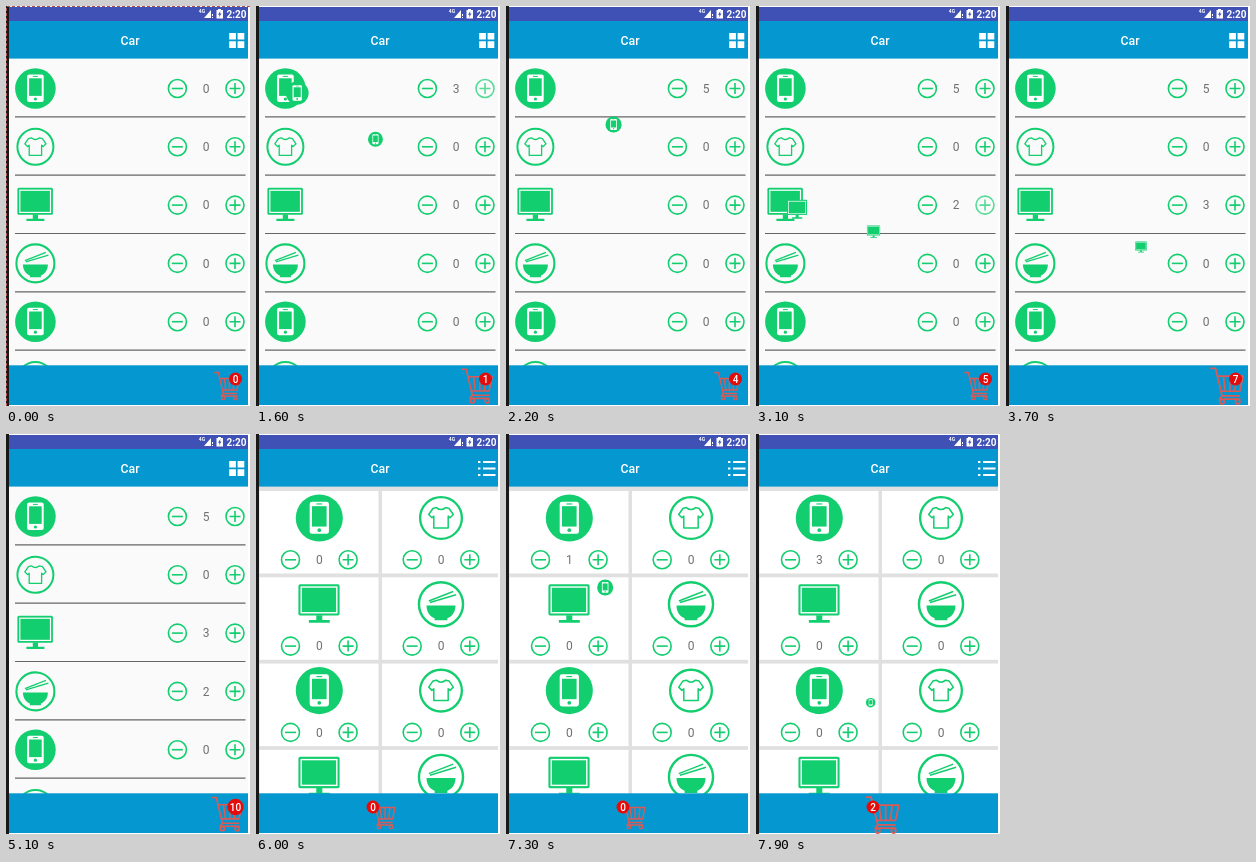
An HTML page that plays this animation: 244x400 px, repeating every 8 s.

```html
<!DOCTYPE html>
<html lang="en">
<head>
<meta charset="utf-8">
<title>Car</title>
<style>
  html, body { margin: 0; width: 100%; height: 100%; overflow: hidden; background: #fff; }
  svg { display: block; }
  text { font-family: Roboto, "Open Sans", sans-serif; text-anchor: middle; }
  .count { font-size: 12px; fill: #707070; }
</style>
</head>
<body>
<svg id="stage" width="244" height="400" viewBox="0 0 244 400">
  <defs>
    <g id="phone">
      <circle r="20.3" fill="#13ce6f"/>
      <rect x="-8.3" y="-14" width="16.6" height="27.6" rx="2" fill="#fff"/>
      <rect x="-6.3" y="-10.2" width="12.6" height="17.6" fill="#13ce6f"/>
      <path d="M-2.5-12.1h5" stroke="#13ce6f" stroke-width="1"/>
      <circle cy="10.5" r="1.6" fill="#13ce6f"/>
    </g>
    <g id="shirt" fill="none" stroke="#13ce6f" stroke-linejoin="round">
      <circle r="18" stroke-width="2"/>
      <path d="M-4-9Q0-5.5 4-9L7-8.2 10.6-3 7.8-.2 6.2-1.6V8.6H-6.2V-1.6L-7.8-.2-10.6-3-7-8.2Z" stroke-width="1.3"/>
    </g>
    <g id="monitor" fill="#13ce6f">
      <rect x="-18" y="-17.3" width="35.5" height="27" rx="1.5"/>
      <rect x="-15.6" y="-14.9" width="30.7" height="22.2" fill="none" stroke="#fff" stroke-width="1.2"/>
      <path d="M-2.6 9.5H2.6V13.6H9V16H-9V13.6H-2.6Z"/>
    </g>
    <g id="bowl" stroke="#13ce6f" fill="none">
      <circle r="19" stroke-width="2.1"/>
      <path d="M-12.5 1H12.5C12.5 6.8 9 10.8 5.5 12V13.8H-5.5V12C-9 10.8-12.5 6.8-12.5 1Z" fill="#13ce6f" stroke="none"/>
      <path d="M-10.5-2.8L10.5-11M-9.5-1.5L13-8.3" stroke-width="1.3"/>
    </g>
    <g id="minus" fill="none" stroke="#13ce6f" stroke-width="1.6">
      <circle r="9"/><path d="M-5.5 0H5.5"/>
    </g>
    <g id="plus" fill="none" stroke="#13ce6f" stroke-width="1.6">
      <circle r="9"/><path d="M-5.5 0H5.5M0-5.5V5.5"/>
    </g>
  </defs>

  <rect width="244" height="400" fill="#fff"/>
  <rect x="3" y="52" width="239" height="308" fill="#fafafa"/>
  <g id="list"></g>
  <g id="grid"><rect x="3" y="52" width="239" height="308" fill="#e0e0e0"/></g>

  <rect x="3" y="1" width="239" height="14" fill="#3f51b5"/>
  <rect x="3" y="15" width="239" height="37.6" fill="#0598d0"/>
  <rect x="3" y="359.3" width="239" height="39.7" fill="#0598d0"/>
  <rect x="242" width="2" height="400" fill="#fff"/>
  <rect width="3" height="400" fill="#181818"/>
  <path id="frame" d="M.5 400V.5H244" fill="none" stroke="#b05050" stroke-dasharray="3 2"/>

  <g fill="#fff">
    <text x="196" y="7" font-size="5" font-weight="700">4G</text>
    <path d="M205 4V12H198ZM206 8h1v2h-1zM206 11h1v1h-1z"/>
    <path d="M212 4V3H215V4H217V12.6H210.5V4Z"/>
    <path d="M214.4 5L212 8.8H213.5L213 11.5 215.5 7.6H214Z" fill="#3f51b5"/>
    <text x="230.5" y="12" font-size="10" font-weight="700">2:20</text>
    <text x="124" y="39.4" font-size="12.3" font-weight="500">Car</text>
    <path id="gridIcon" d="M223.2 27h6.7v6.6h-6.7zM231.6 27h6.7v6.6h-6.7zM223.2 35.3h6.7v6.6h-6.7zM231.6 35.3h6.7v6.6h-6.7z"/>
    <path id="listIcon" d="M222 27h2.4v2H222zM227 27h12.5v2H227zM222 33.5h2.4v2H222zM227 33.5h12.5v2H227zM222 40h2.4v2H222zM227 40h12.5v2H227z"/>
  </g>

  <g id="cart" fill="none" stroke="#dc5a55" stroke-width="1.3" stroke-linejoin="round">
    <path d="M-13-13.5H-9L-4 7.5H9.5M-7.5-7.5H12L9.5 4H-5M-3-7.5L-1.5 4M2-7.5V4M7-7.5L5.7 4M-4 7.5L-6 10H10"/>
    <circle cx="-4" cy="12" r="1.7"/><circle cx="8" cy="12" r="1.7"/>
  </g>
  <g id="badge">
    <circle fill="#e40b0b"/>
    <text y="3.5" font-size="10" font-weight="500" fill="#fff">0</text>
  </g>
  <g id="flights"></g>
</svg>
<script>
const LOOP = 8000, SWITCH = 5900, FLIGHT = 400, BOUNCE = 500, PRESS = 100;
const ITEMS = ["phone", "shirt", "monitor", "bowl"];
const $ = id => document.getElementById(id);

function add(parent, tag, attrs) {
  const node = document.createElementNS("http://www.w3.org/2000/svg", tag);
  for (const key in attrs) node.setAttribute(key, attrs[key]);
  return parent.appendChild(node);
}
const place = (x, y, s = 1) => `translate(${x} ${y}) scale(${s})`;
const show = (node, on) => node.setAttribute("visibility", on ? "visible" : "hidden");

function addItem(parent, name, x, y, scale, cx, cy, gap) {
  add(parent, "use", { href: "#" + name, transform: place(x, y, scale) });
  add(parent, "use", { href: "#minus", transform: place(cx - gap, cy) });
  const plus = add(parent, "use", { href: "#plus", transform: place(cx + gap, cy) });
  const count = add(parent, "text", { class: "count", x: cx, y: cy + 4.3 });
  return { name, x, y, scale, plus, count };
}

const views = [
  { node: $("list"), items: [], cart: [221.3, 380], badge: [229.5, 373], target: [222, 375], shift: [9.5, 5] },
  { node: $("grid"), items: [], cart: [127, 381], badge: [117, 373], target: [125, 378], shift: [10, 8] }
];

for (let i = 0; i < 6; i++) {
  const y = 82.5 + 58.3 * i;
  views[0].items.push(addItem(views[0].node, ITEMS[i % 4], 29.4, y, 1, 200.2, y, 28.8));
  add(views[0].node, "path", { d: `M9 ${110.8 + 58.35 * i}H239.5`, stroke: "#666", "stroke-width": 1.2 });
}
for (let i = 0; i < 8; i++) {
  const right = i % 2, top = 57 + 86.3 * (i >> 1), x = right ? 185 : 63.3;
  add(views[1].node, "rect", { x: right ? 126 : 3.5, y: top, width: right ? 116 : 119, height: 82.5, fill: "#fff" });
  views[1].items.push(addItem(views[1].node, ITEMS[i % 4], x, top + 27, 1.16, x, top + 68.8, 28.8));
}

// [time, view, item]
const taps = [
  [900, 0, 0], [1424, 0, 0], [1595, 0, 0], [1800, 0, 0], [2050, 0, 0],
  [2928, 0, 2], [3095, 0, 2], [3490, 0, 2],
  [4390, 0, 3], [4650, 0, 3],
  [7100, 1, 0], [7340, 1, 0], [7580, 1, 0]
].map(([time, view, index]) => {
  const item = views[view].items[index];
  return { time, view, item, copy: add($("flights"), "use", { href: "#" + item.name }) };
});

function fly({ copy, item, view }, t) {
  show(copy, t >= 0 && t < 1);
  if (t < 0 || t >= 1) return;
  const { target, shift } = views[view];
  const x = item.x + shift[0], y = item.y + shift[1];
  copy.setAttribute("transform", place(
    x + (target[0] - x) * t,
    y + (target[1] - y) * t * t - 40 * t * (1 - t),
    item.scale * (0.57 - 0.46 * t)));
}

function render(now) {
  const current = now < SWITCH ? 0 : 1, view = views[current];
  views.forEach((v, i) => v.node.setAttribute("display", i === current ? "inline" : "none"));
  show($("gridIcon"), current === 0);
  show($("listIcon"), current === 1);
  show($("frame"), now < 900);

  let total = 0, lastArrival = -Infinity;
  const counts = new Map(), pressed = new Set();
  for (const tap of taps) {
    const age = now - tap.time, active = tap.view === current;
    fly(tap, active ? age / FLIGHT : -1);
    if (!active || age < 0) continue;
    counts.set(tap.item, (counts.get(tap.item) || 0) + 1);
    if (age < PRESS) pressed.add(tap.item);
    if (age >= FLIGHT) {
      total++;
      lastArrival = tap.time + FLIGHT;
    }
  }
  for (const item of view.items) {
    item.count.textContent = counts.get(item) || 0;
    item.plus.setAttribute("opacity", pressed.has(item) ? 0.7 : 1);
  }

  const phase = Math.min(1, (now - lastArrival) / BOUNCE);
  const scale = 1 + 0.32 * Math.sin(Math.PI * Math.pow(phase, 0.6));
  $("cart").setAttribute("transform", place(...view.cart, scale));
  const [disc, label] = $("badge").children;
  $("badge").setAttribute("transform", place(...view.badge));
  disc.setAttribute("r", total > 9 ? 8.2 : 6.5);
  label.textContent = total;
}

let start;
function tick(time) {
  start ??= time;
  render((time - start) % LOOP);
  requestAnimationFrame(tick);
}
render(0);
requestAnimationFrame(tick);
</script>
</body>
</html>
```
